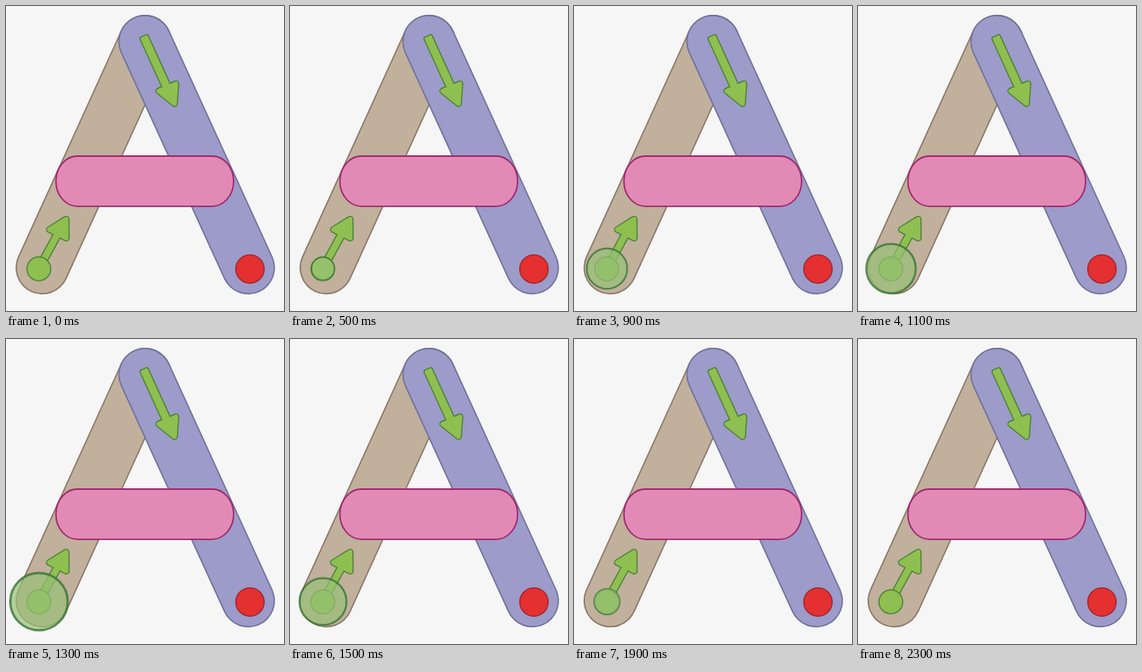
An HTML page that plays this animation: 348x382 px, repeating every 2.4 s.

```html
<!DOCTYPE html>
<html lang="en">
<head>
<meta charset="utf-8">
<title>Letter A tracing</title>
<style>
  html, body { margin: 0; width: 100%; height: 100%; overflow: hidden; background: #f6f6f6; }
  svg { display: block; width: 348px; height: 382px; }
  .arrow { stroke-linejoin: round; }
</style>
</head>
<body>
<svg id="stage" viewBox="0 0 348 382"></svg>
<script>
const stage = document.getElementById('stage');
const LOOP = 2400, STEP = 100;
const GREEN = '#8fbf50', DARK_GREEN = '#4c8038';

function add(tag, attrs) {
  const el = document.createElementNS('http://www.w3.org/2000/svg', tag);
  for (const key in attrs) el.setAttribute(key, attrs[key]);
  stage.appendChild(el);
  return el;
}

// Round-ended bar drawn as a wide outline line under a slightly thinner one
function bar(x1, y1, x2, y2, fill, edge) {
  for (const [stroke, width] of [[edge, 67], [fill, 63.6]]) {
    add('line', { x1, y1, x2, y2, stroke, 'stroke-width': width, 'stroke-linecap': 'round' });
  }
}

// Outlined arrow with softened corners; the shaft is a thin polygon
function arrow(shaft, head) {
  for (const [color, trim] of [[DARK_GREEN, 0], [GREEN, 2.8]]) {
    for (const [d, round] of [[shaft, 5.6], [head, 8.4]]) {
      add('path', { d, class: 'arrow', fill: color, stroke: color, 'stroke-width': round - trim });
    }
  }
}

bar(45.4, 327.8, 174.2, 44.5, '#c0b09c', '#8b7868');
bar(174, 44.5, 303.3, 327.8, '#9c9bc9', '#71729a');
add('rect', {
  x: 62.5, y: 188, width: 222.4, height: 62.8, rx: 27, ry: 31,
  fill: '#e28ab6', stroke: '#a0286e', 'stroke-width': 1.8
});
arrow('M38.6 327.7L61.6 285.7L66.4 288.3L43.4 330.3Z', 'M75.3 266.9L54.2 280L75.5 290.8Z');
arrow('M169.8 40.9L176.2 38L204.2 99.5L197.8 102.4Z', 'M191.2 106.5L212.8 97.5L211 122.2Z');
add('circle', { cx: 41.1, cy: 329.2, r: 14.9, fill: GREEN, stroke: DARK_GREEN, 'stroke-width': 1.4 });
add('circle', { cx: 305.4, cy: 329.4, r: 17.7, fill: '#e53032', stroke: '#a52a2c', 'stroke-width': 1.6 });

const pulse = add('circle', {
  cx: 41.3, cy: 328.9, fill: '#99c177', 'fill-opacity': 0.7,
  stroke: '#397535', 'stroke-opacity': 0.8
});

// Outer radius: grows for the first half, shrinks in the second, gone on the last step
function pulseRadius(step) {
  if (step <= 12) return step * 2.93;
  return step < 23 ? (24 - step) * 3.4 : 0;
}

function draw(time) {
  const outer = pulseRadius(Math.floor((time % LOOP) / STEP));
  const line = outer * 0.08;
  pulse.setAttribute('r', outer - line / 2);
  pulse.setAttribute('stroke-width', line);
}

const start = performance.now();
function tick() {
  draw(performance.now() - start);
  requestAnimationFrame(tick);
}
draw(0);
requestAnimationFrame(tick);
</script>
</body>
</html>
```
